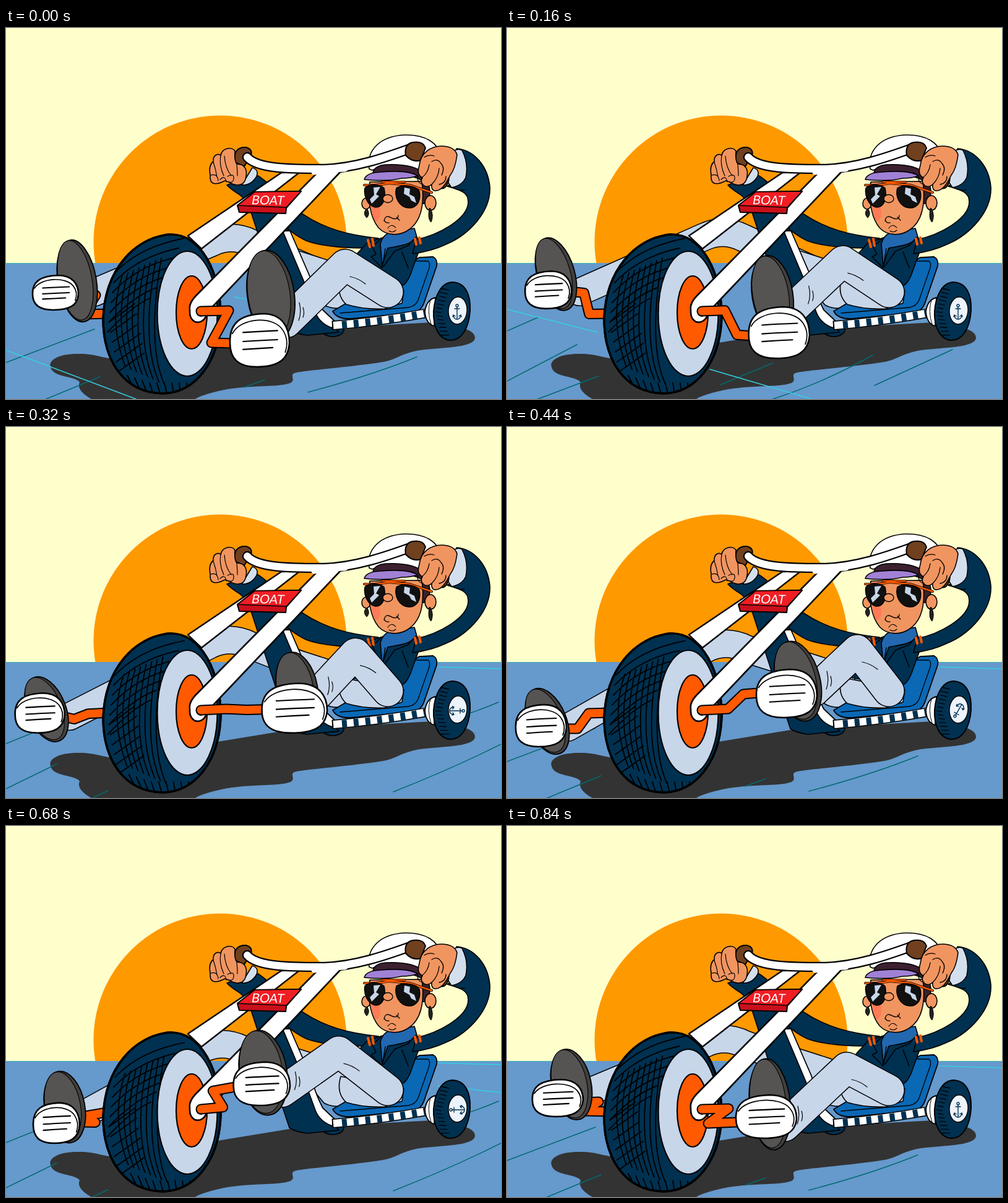
An HTML page for the animation above (880 ms loop, 800 by 600 pixels).

```html
<!DOCTYPE html>
<html lang="en">
<head>
<meta charset="utf-8">
<title>Sunset trike</title>
<style>
html,body{margin:0;width:100%;height:100%;overflow:hidden;background:#ffc}
svg{display:block;width:800px;height:600px}
</style>
</head>
<body>
<svg id="stage" viewBox="0 0 800 600" stroke-linecap="round" stroke-linejoin="round"></svg>
<script>
const NAVY = '#003151', JEAN = '#c8d6ea', SKIN = '#f19560', RED = '#f01e24', ORANGE = '#ff5a00';
const stage = document.getElementById('stage');
const $ = id => document.getElementById(id);

const path = (d, fill = 'none', w = 1.6, extra = '') =>
  `<path d="${d}" fill="${fill}" stroke="#000" stroke-width="${w}" ${extra}/>`;
const flat = (d, fill) => `<path d="${d}" fill="${fill}"/>`;
const oval = (x, y, rx, ry, fill, w = 1.6, turn = 0) =>
  `<ellipse cx="${x}" cy="${y}" rx="${rx}" ry="${ry}" fill="${fill}" stroke="#000" stroke-width="${w}" transform="rotate(${turn} ${x} ${y})"/>`;
// an outlined tube: dark stroke below, coloured stroke above
const tube = (id, color, w, line = 3) =>
  `<g fill="none"><path class="${id}" stroke="#000" stroke-width="${w + line}"/><path class="${id}" stroke="${color}" stroke-width="${w}"/></g>`;
const pipe = (d, color, w, line = 3) =>
  `<g fill="none"><path d="${d}" stroke="#000" stroke-width="${w + line}"/><path d="${d}" stroke="${color}" stroke-width="${w}"/></g>`;
const holder = id => `<g id="${id}"></g>`;

function backdrop() {
  return `<rect width="800" height="600" fill="#ffffcc"/>
  <circle cx="346" cy="346" r="204.5" fill="#ff9900"/>
  <rect y="380" width="800" height="220" fill="#6699cc"/>
  <path d="M0 380.5H144M548 380.5H800" stroke="#3fb3b5" stroke-width="1.2"/>` +
  flat('M72 548C68 538 84 527 115 527C150 526 160 538 190 534L470 488L690 476C740 482 758 490 758 501C757 515 720 516 690 519C640 522 637 535 610 540C560 548 500 552 470 557C455 560 470 568 460 574C440 582 385 576 340 588C320 593 310 597 306 600H138C122 591 115 582 119 573C112 562 75 566 72 548Z', '#333') +
  holder('waves');
}

function rearParts() {
  return oval(528, 488, 18, 11, NAVY) +
  path('M396 298L446 298L462 340L510 462L538 492L486 497Q466 494 458 488L446 452Z', NAVY) +
  path('M466 358L522 376L566 392L550 452Q528 456 514 448L494 424Z', JEAN) +
  path('M447 328L459 328L492 404Q502 438 512 456L531 474L527 485Q507 478 500 460L484 416Z', '#fff', 1.8) +
  path('M662 376Q666 370 672 371L690 370Q698 374 696 385L675 446Q670 459 655 461L560 470Q535 472 528 458L545 448Z', '#0a68b5', 1.8) +
  path('M663 377L682 377Q686 380 684 388L666 440Q662 450 650 452L540 461', 'none', 1.3) +
  `<path d="M527 481C580 477 630 470 681 461" fill="none" stroke="#000" stroke-width="15" stroke-linecap="butt"/>
  <path d="M529 481C580 477 630 470 680 461" fill="none" stroke="#fff" stroke-width="12" stroke-linecap="butt"/>
  <path d="M543 480C590 476 640 469 680 461" fill="none" stroke="${NAVY}" stroke-width="12" stroke-dasharray="8 11" stroke-linecap="butt"/>` +
  path('M694 436Q680 439 677 458Q678 478 692 482Z', '#fff', 1.8) +
  path('M686 440Q680 458 687 479', 'none', 1) +
  path('M722 411C743 412 751 432 750 457C748 486 736 506 717 505C699 503 690 482 691 458C693 432 704 411 722 411Z', NAVY, 2) +
  path(Array.from({length: 13}, (_, i) => {
    const y = 421 + i * 6.3, e = Math.abs(i - 6) * 1.5;
    return `M${695 + e * .9} ${y}l${8 + e * .5} ${3 - i * .25}`;
  }).join(''), 'none', 1.3) +
  oval(730, 457, 15, 22, '#edf3fb', 1.4, 4) +
  `<g id="anchor" fill="none" stroke="${NAVY}" stroke-width="1.4"><circle cy="-10" r="2"/><path d="M0-8V12M-4-5H4M-6 6Q-5 12 0 12Q5 12 6 6M-7 8L-6 5L-3 7M7 8L6 5L3 7"/></g>`;
}

function farArm() {
  return path('M402 236C425 247 445 278 478 300C515 325 553 335 602 340L600 356C555 356 515 355 485 344C448 327 426 290 400 291L378 270Q362 260 357 254Z', NAVY);
}

function body() {
  return path('M584 347L612 338L660 334L672 348L656 392Q648 417 636 418L548 404Q556 375 572 360Z', NAVY) +
  path('M605 349C608 338 614 333 620 331L660 324L664 338C650 354 632 352 617 356L608 384Z', '#2268b0') +
  path('M607 340L592 354L598 366L590 370L608 388L613 357M662 338L650 352L628 361L610 386M640 362L650 388', 'none', 1.5) +
  path('M728 195C757 197 779 224 782 257C784 296 749 334 711 350C692 359 674 363 657 365L663 342C698 335 747 309 747 281C747 267 738 263 713 256L734 242Z', NAVY) +
  path('M741 262Q728 264 718 254', 'none', 1.3) +
  path('M722 199Q732 194 737 198Q748 219 743 242Q737 255 720 258L712 246Z', '#d4dfed') +
  `<path d="M585 343L588 354M592 341L594 352M661 341L663 350M668 339L670 348" stroke="${ORANGE}" stroke-width="4"/>`;
}

function head() {
  return path('M668 249Q684 246 685 263L684 283L666 285Z', '#3a2227') +
  oval(686, 283, 9, 12, SKIN) + oval(582, 284, 7, 9, SKIN) +
  path('M684 292Q681 309 687 314Q692 303 686 292ZM582 293Q576 300 583 307Q589 301 584 293Z', '#222', 1) +
  path('M588 249C584 280 589 307 602 323C614 336 635 337 650 327C670 314 677 286 672 248Z', SKIN) +
  flat('M590 278Q605 280 605 300Q603 316 596 311Q589 297 590 278Z', '#ff7a56') +
  path('M611 312C613 301 619 305 625 308C633 310 634 307 634 303M631 306L636 311M612 312Q614 316 619 315', 'none', 1.3) +
  path('M617 324Q623 315 630 323M619 328Q625 332 630 327', 'none', 1.1) +
  `<path d="M579 254Q600 255 618 251L652 254L688 266M608 249H644" fill="none" stroke="#000" stroke-width="4"/>
  <path d="M579 254Q600 255 618 251L652 254L688 266M608 249H644" fill="none" stroke="${ORANGE}" stroke-width="2.4"/>` +
  path('M580 259C586 251 605 253 611 259C615 278 608 290 597 290C583 287 578 270 580 259Z', '#111') +
  path('M631 259C642 252 662 255 668 264C671 280 664 291 651 291C636 290 627 274 631 259Z', '#111') +
  flat('M594 258L605 257L598 269L603 272L591 284L588 277L595 270Z', '#c8d6ea') +
  flat('M644 258L653 260L652 269L660 273L663 283L655 279L652 273L643 268Z', '#c8d6ea') +
  oval(617, 276, 8, 6.5, SKIN, 1.3) +
  path('M587 228C582 198 604 175 644 173C680 172 697 187 702 204L672 245L657 225Q620 216 592 230Z', '#fff') +
  path('M593 234Q596 222 614 221Q650 219 671 231L675 248Q650 233 593 234Z', '#3c2030') +
  path('M579 245Q582 234 605 233Q650 229 665 239Q655 243 640 243Q615 249 579 245Z', '#a181d6');
}

function bars() {
  return path('M294 336L445 234L475 233L316 357Z', '#fff', 2.4) +
  path('M398 226Q409 229 405 240Q396 255 381 254Z', '#d4dfed') +
  path('M369 217C368 200 374 192 388 193Q399 196 396 206L385 224Z', '#70401f', 2) +
  path('M354 247C334 257 329 250 330 238Q327 222 335 216C334 206 342 202 347 206C349 194 365 191 370 199C370 205 368 213 373 220C387 220 391 230 387 245C383 257 369 255 362 250Z', SKIN) +
  path('M335 217Q339 228 341 241M347 206Q344 222 352 239M353 207Q354 226 364 239M373 221Q374 231 374 239M331 238Q342 235 343 247M346 245Q354 237 356 249M358 240Q369 234 368 244Q367 251 360 249', 'none', 1.2) +
  pipe('M390 209C406 228 460 228 515 228C565 226 612 210 656 194', '#fff', 12, 4.5) +
  path('M646 206Q643 188 657 185Q674 182 678 194L670 214Q657 218 646 206Z', '#70401f', 2) +
  oval(708, 247, 7, 13, '#70401f', 2, 18) +
  path('M668 222C670 202 687 190 706 191Q725 192 729 205Q726 228 718 238C712 250 704 265 692 263Q687 261 688 253C678 262 667 251 673 242Q663 238 668 222Z', SKIN) +
  path('M676 209Q684 204 692 207M672 242Q682 235 684 221M688 253Q699 242 700 227M704 238Q710 226 703 219Q697 210 688 216M666 240Q663 250 674 253M700 253Q711 251 711 240', 'none', 1.3);
}

function frontWheel() {
  const outline = 'M263 334C316 331 347 397 347 467C345 540 305 592 252 591C190 589 157 538 157 470C160 391 207 340 263 334Z';
  return `<clipPath id="tyre"><path d="${outline}"/></clipPath>` +
  path(outline, NAVY, 3.4) +
  `<path id="tread" clip-path="url(#tyre)" fill="none" stroke="#000" stroke-width="1.9"/>` +
  path(outline, 'none', 3.4) +
  oval(293, 462, 48.5, 101, JEAN, 2.2) +
  oval(300, 460, 25, 59, ORANGE, 2.2);
}

function nearStrut() {
  return path('M297 456Q295 446 306 434L508 229L542 231L325 460C323 473 313 478 305 475Q296 470 297 456Z', '#fff', 2.6) +
  `<path d="M498 233L520 229L548 228" fill="none" stroke="#fff" stroke-width="9"/>` +
  path('M316 452Q309 452 308 459Q309 466 316 466', 'none', 1.8);
}

function sign() {
  return path('M374 287L402 265L477 264L453 291L452 300L377 298Z', '#c9101c', 2.2) +
  path('M374 287L402 265L477 264L453 290Z', RED, 1.6) +
  `<text transform="translate(396 285) rotate(1) skewX(-9)" font-family="Lato, 'Open Sans', sans-serif" font-size="20" fill="#fff">BOAT</text>`;
}

stage.innerHTML = backdrop() + farArm() +
  tube('legL', JEAN, 43) + tube('crankL', ORANGE, 13, 4) + holder('footL') +
  rearParts() + body() + head() +
  path('M541 405Q533 432 550 447Q580 456 612 454L640 445L643 425Z', JEAN) +
  tube('legR', JEAN, 49) + holder('folds') + bars() + frontWheel() + nearStrut() +
  tube('crankR', ORANGE, 13, 4) + holder('footR') + sign();

// key poses; one step lasts 40 ms
const STEPS = 22, KEYS = [0, 3, 6, 11, 14, 19, 21];
const pose = {
  // sole: x, y, rx, ry
  soleL: [[80,428,37,28],[71,416,37,30],[59,447,39,31],[55,483,41,34],[82,500,38,35],[79,462,38,31],[82,440,41,30]],
  soleR: [[410,505,48,43],[426,501,47,42],[466,471,54,41],[452,431,49,39],[417,404,48,39],[415,434,45,33],[419,470,49,35]],
  // upper: x, y, rx, ry, turn
  upperL: [[115,409,31,67,-10],[86,385,30,63,-14],[70,437,31,56,-20],[65,476,31,56,-22],[85,478,33,59,-10],[100,436,32,58,-12],[104,418,32,58,-12]],
  upperR: [[428,432,38,73,-8],[417,432,34,68,-10],[460,430,32,59,-8],[470,411,36,66,-14],[426,384,36,67,-10],[415,417,39,71,-8],[425,450,33,74,-6]],
  // leg: ankle, knee
  legL: [[142,428,365,340],[122,418,345,329],[110,453,364,340],[98,486,355,351],[124,496,352,356],[132,440,350,350],[140,427,352,345]],
  legR: [[453,476,548,383],[455,454,537,380],[493,442,559,371],[496,427,566,361],[459,413,550,358],[443,448,534,373],[449,485,549,391]],
  // crank: pedal, elbow, arm
  crankL: [[119,432,145,432,126,463],[112,418,131,418,132,462],[100,453,113,458,133,464],[95,488,114,488,132,463],[121,498,140,497,130,464],[121,463,145,464,130,470],[124,447,148,446,126,461]],
  crankR: [[366,510,332,509,360,457],[382,506,362,504,352,457],[414,476,386,476,354,456],[406,430,382,432,357,456],[373,411,342,418,354,455],[372,438,332,443,350,455],[372,479,325,481,358,457]]
};

// periodic cubic through the key poses
function at(rows, s) {
  const n = KEYS.length;
  const row = k => rows[(k + n) % n];
  const time = k => KEYS[(k + n) % n] + STEPS * Math.floor(k / n);
  let i = n - 1;
  while (KEYS[i] > s) i--;
  const h = time(i + 1) - time(i), u = (s - time(i)) / h;
  return row(i).map((a, j) => {
    const b = row(i + 1)[j];
    const m = (b - row(i - 1)[j]) / (time(i + 1) - time(i - 1)) * h;
    const q = (row(i + 2)[j] - a) / (time(i + 2) - time(i)) * h;
    const v = a + u * (m + u * (3 * (b - a) - 2 * m - q + u * (2 * (a - b) + m + q)));
    return Math.round(v * 100) / 100;
  });
}

function setAll(name, d) {
  document.querySelectorAll('.' + name).forEach(e => e.setAttribute('d', d));
}

function blob(x, y, rx, ry, fill, w) {
  const p = (a, b) => `${(x + a * rx).toFixed(1)} ${(y + b * ry).toFixed(1)} `;
  return path('M' + p(-1, .1) + 'C' + p(-1.02, -.7) + p(-.6, -.96) + p(.1, -1) +
    'C' + p(.75, -1) + p(1, -.5) + p(1, .1) + 'C' + p(.96, .75) + p(.6, 1) + p(-.1, 1) +
    'C' + p(-.7, 1) + p(-1, .72) + p(-1, .1) + 'Z', fill, w);
}

function foot(side, s) {
  const [x, y, rx, ry] = at(pose['sole' + side], s);
  const [ux, uy, ux2, uy2, turn] = at(pose['upper' + side], s);
  const lines = [-.34, 0, .3].map((k, i) =>
    `M${x - rx * .56} ${y + ry * k + 2}q${rx * .5} ${-ry * .04} ${rx * (i < 2 ? 1.16 : 1)} ${-ry * .07}`).join('');
  $('foot' + side).innerHTML =
    oval(ux, uy, ux2, uy2, '#42403f', 1.8, turn) +
    oval(ux - 3, uy - 1, ux2 - 4, uy2 - 2, '#555452', 1.1, turn) +
    blob(x, y, rx, ry, '#fff', 2.6) +
    path(`M${x - rx * .92} ${y - ry * .25}C${x - rx * .65} ${y - ry * .85} ${x + rx * .45} ${y - ry * .95} ${x + rx * .78} ${y - ry * .38}Q${x + rx} ${y} ${x + rx * .86} ${y + ry * .45}`, 'none', 1.7) +
    path(lines, 'none', 2.1);
}

const DARK = [
  'M0 541L143 487M65 600L152 564M385 581L418 569M488 589Q590 562 664 532',
  'M0 512L142 455M0 585L82 545M140 600L165 588M626 590Q720 553 800 513M688 481Q750 465 796 445',
  'M0 490L50 468M0 571L113 512M50 600L148 563M345 577L429 542M430 600Q515 572 591 529M594 578L720 520'
];
const LIGHT = [
  'M0 521L210 600M368 435L411 442M690 455L704 457',
  'M0 455L146 492M328 552L492 600M690 478L706 482',
  'M365 435L412 442M752 500L800 512',
  'M698 388L800 391',
  'M0 455L50 469M328 552L496 600',
  'M698 420L800 431M690 383L800 386'
];
function lightSet(s) {
  return s < 2 ? 0 : s < 5 ? 1 : s < 8 ? 2 : s < 13 ? 3 : s < 16 ? 4 : s < 21 ? 5 : 3;
}

function treadPath(phase) {
  let d = '';
  for (let i = 0; i < 13; i++) {
    const y = 366 + i * 16 + phase * 16;
    if (i < 7) d += `M${176 - i * 2} ${y + 30}Q${215 - i * 2} ${y - 12} ${288 - i * 9} ${y - 26}`;
    else d += `M${166 + (i - 7) * 3} ${y - 2}q20 ${-14} 42 ${-30}`;
  }
  for (let i = 0; i < 8; i++) {
    const x = 166 + i * 9 + phase * 7;
    d += `M${x + 22} ${400 - i * 4}Q${x - 2} ${470 + i * 6} ${x + 27} ${548 + i * 4}`;
  }
  for (let i = 0; i < 10; i++) {
    const x = 196 + i * 12 + phase * 8;
    d += `M${x} ${562 + Math.min(i, 3) * 4}l${9 - i} 18`;
  }
  return d;
}

function draw(s) {
  const mod = s % 5;
  $('waves').innerHTML =
    `<g fill="none" stroke-width="1.5"><path d="${DARK[mod < 2 ? 0 : mod < 4 ? 1 : 2]}" stroke="#006b70"/><path d="${LIGHT[lightSet(s)]}" stroke="#36cfe0"/></g>`;

  const [ax, ay, kx, ky] = at(pose.legL, s);
  setAll('legL', `M${ax} ${ay}L${kx - 32} ${ky + 7}Q${kx} ${ky - 8} ${kx + 32} ${ky + 8}L505 396`);
  const [bx, by, nx, ny] = at(pose.legR, s);
  setAll('legR', `M${bx} ${by}L${nx} ${ny}L617 427`);
  $('folds').innerHTML = path(
    `M${bx + 21} ${by - 32}q4 16 -1 29M${bx + 27} ${by - 24}q3 9 0 16M${nx + 8} ${ny + 19}q14 3 25 12`, 'none', 1.2);

  const l = at(pose.crankL, s), r = at(pose.crankR, s);
  const bend = c => `M${c[0]} ${c[1]}L${c[2]} ${c[3]}L${c[4]} ${c[5]}`;
  setAll('crankL', bend(l) + 'L168 462');
  setAll('crankR', bend(r) + 'L315 458');
  foot('L', s);
  foot('R', s);

  const spin = s < 7 ? 0 : s < 9 ? 90 : s < 11 ? 150 : s < 16 ? 210 : s < 20 ? 270 : 0;
  $('anchor').setAttribute('transform', `translate(729 459) rotate(${spin})`);
  $('tread').setAttribute('d', treadPath(s < 7 || s > 20 ? 0 : s < 14 ? .35 : .65));
}

let last = -1;
function tick(now) {
  const s = Math.floor(now % 880 / 40) % STEPS;
  if (s !== last) draw(last = s);
  requestAnimationFrame(tick);
}
draw(0);
requestAnimationFrame(tick);
</script>
</body>
</html>
```
